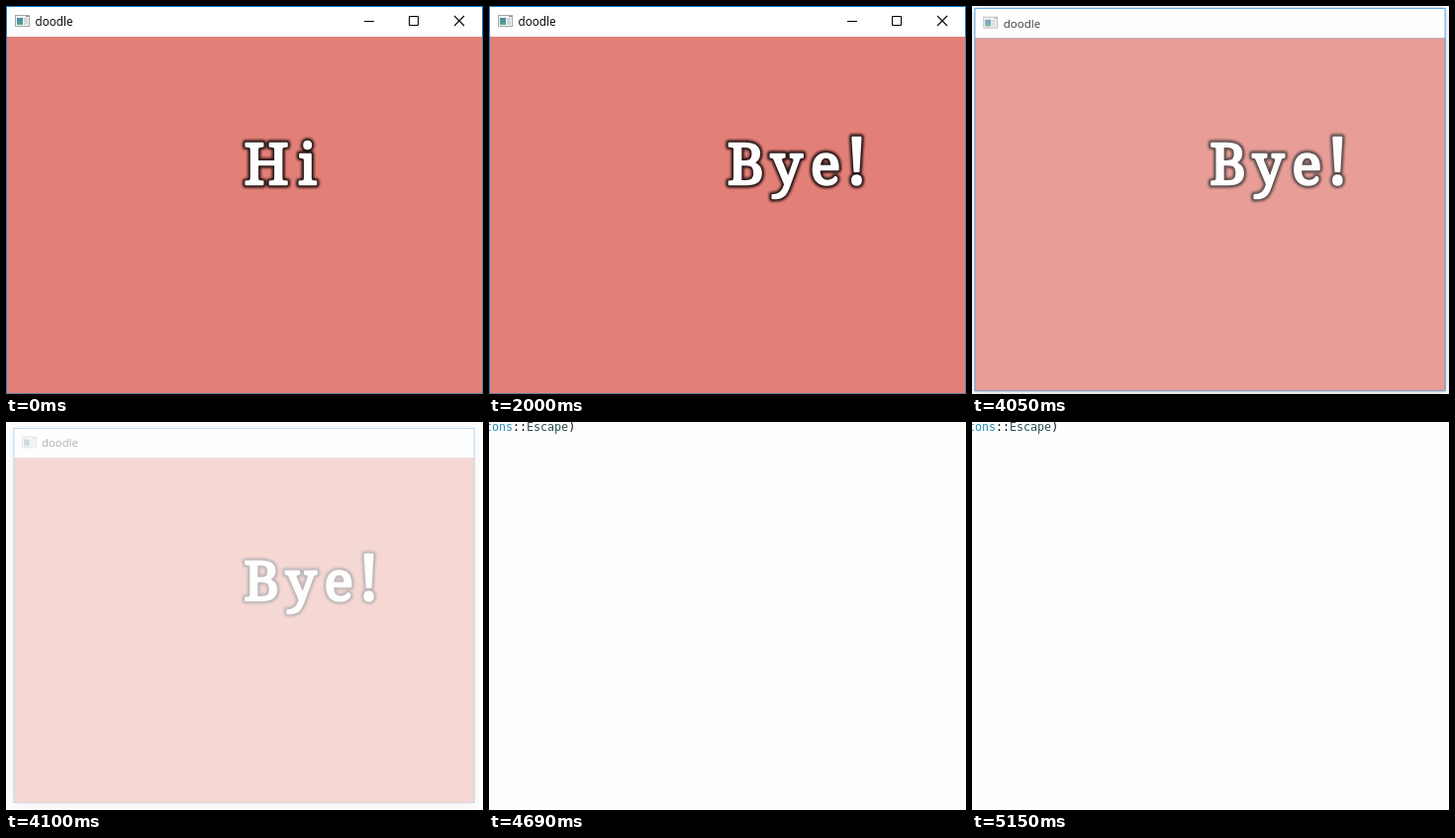
An HTML page that plays this animation: 482 px wide and 392 px high, repeating every 5.99 s.

```html
<!DOCTYPE html>
<html lang="en">
<head>
<meta charset="utf-8">
<title>doodle</title>
<style>
  html, body { margin: 0; width: 100%; height: 100%; overflow: hidden; background: #fefefe; }
  svg { display: block; width: 482px; height: 392px; }
  .title { font: 11.7px "Open Sans", sans-serif; }
  .word { font: 57px "Noto Serif", serif; text-anchor: middle; stroke-linejoin: round; }
  .word .glow { fill: #2c1816; stroke: #2c1816; stroke-width: 7.4; filter: url(#soft); }
  .word .face { fill: #fff; stroke: #fff; stroke-width: 2.5; }
  .code { font: 11.65px "DejaVu Sans Mono", monospace; fill: #111; white-space: pre; }
  .line { fill: none; stroke: #000; }
</style>
</head>
<body>
<svg viewBox="0 0 482 392">
  <defs>
    <filter id="soft" x="-20%" y="-20%" width="140%" height="140%"><feGaussianBlur stdDeviation="1"/></filter>
    <filter id="shade" x="-10%" y="-10%" width="120%" height="120%"><feGaussianBlur stdDeviation="5"/></filter>
    <linearGradient id="pane" x2="0" y2="1">
      <stop stop-color="#4a86b4"/><stop offset="1" stop-color="#5aa886"/>
    </linearGradient>
  </defs>

  <g id="win">
    <rect id="shadow" y="2" width="482" height="392" opacity=".2" filter="url(#shade)"/>
    <rect width="482" height="392" fill="#1883d7"/>
    <path d="M481 31h1v361H0v-1h481z" fill="#6d7f9f"/>
    <rect x="1" y="1" width="480" height="30" fill="#fff"/>
    <rect x="1" y="31" width="480" height="360" fill="#e27f77"/>

    <g>
      <rect x="9.5" y="9.5" width="14" height="11" fill="#f4f4f4" stroke="#a3a8ab"/>
      <rect x="11" y="12" width="6" height="7" fill="url(#pane)"/>
      <rect x="18" y="12" width="4" height="7" fill="#d5d9dc"/>
      <rect x="20" y="10" width="3" height="1" fill="#8b9298"/>
    </g>
    <text class="title" x="29.6" y="20">doodle</text>
    <g id="buttons">
      <path class="line" d="M362 15.5h10M407.5 10.5h9v9h-9z"/>
      <path class="line" d="M453 10l10 10M463 10l-10 10" stroke-width="1.1"/>
    </g>
    <g id="hi" class="word"></g>
    <g id="bye" class="word"></g>
  </g>

  <text id="code" class="code" x="-4" y="9"><tspan fill="#2b91af">tons</tspan>::<tspan fill="#2f4f4f">Escape</tspan>)</text>
  <path id="beam" class="line" d="M0 .5h3M4 .5h3M3.5 1v15M0 16.5h3M4 16.5h3"/>
</svg>

<script>
const LOOP = 5990;
const $ = id => document.getElementById(id);
const show = (id, on) => $(id).setAttribute('visibility', on ? 'visible' : 'hidden');

// letter, centre x, font size
const words = {
  hi: [['H', 263, 57], ['i', 304.5, 57]],
  bye: [['B', 259.5, 57], ['y', 300.5, 57], ['e', 340, 57], ['!', 371.5, 66]]
};
for (const id in words) {
  const layer = cls => `<g class="${cls}">` + words[id].map(([ch, x, size]) =>
    `<text x="${x}" y="180.3" style="font-size:${size}px">${ch}</text>`).join('') + '</g>';
  $(id).innerHTML = layer('glow') + layer('face');
}

// start, scale, opacity
const closing = [[0, 1, 1], [4050, .988, .76], [4100, .967, .3], [4150, .956, .11], [4200, .95, 0]];
// start, x, y
const pointer = [[4970, 334, 345], [5010, 324, 286], [5060, 328, 318], [5110, 333, 372]];

const at = (steps, t) => steps.filter(s => s[0] <= t).pop();

function draw(now) {
  const t = now % LOOP;
  const [, scale, alpha] = at(closing, t);
  $('win').setAttribute('transform', scale === 1 ? '' :
    `translate(240.5 195.5) scale(${scale}) translate(-241 -196)`);
  $('win').setAttribute('opacity', alpha);
  show('shadow', scale < 1);
  show('buttons', t < 3990);
  show('hi', t < 2000);
  show('bye', t >= 2000);
  show('code', t >= 4690);

  const spot = t < 5150 && at(pointer, t);
  show('beam', spot);
  if (spot) $('beam').setAttribute('transform', `translate(${spot[1]} ${spot[2]})`);
}

const start = performance.now();
function tick() {
  draw(performance.now() - start);
  requestAnimationFrame(tick);
}
tick();
</script>
</body>
</html>
```
